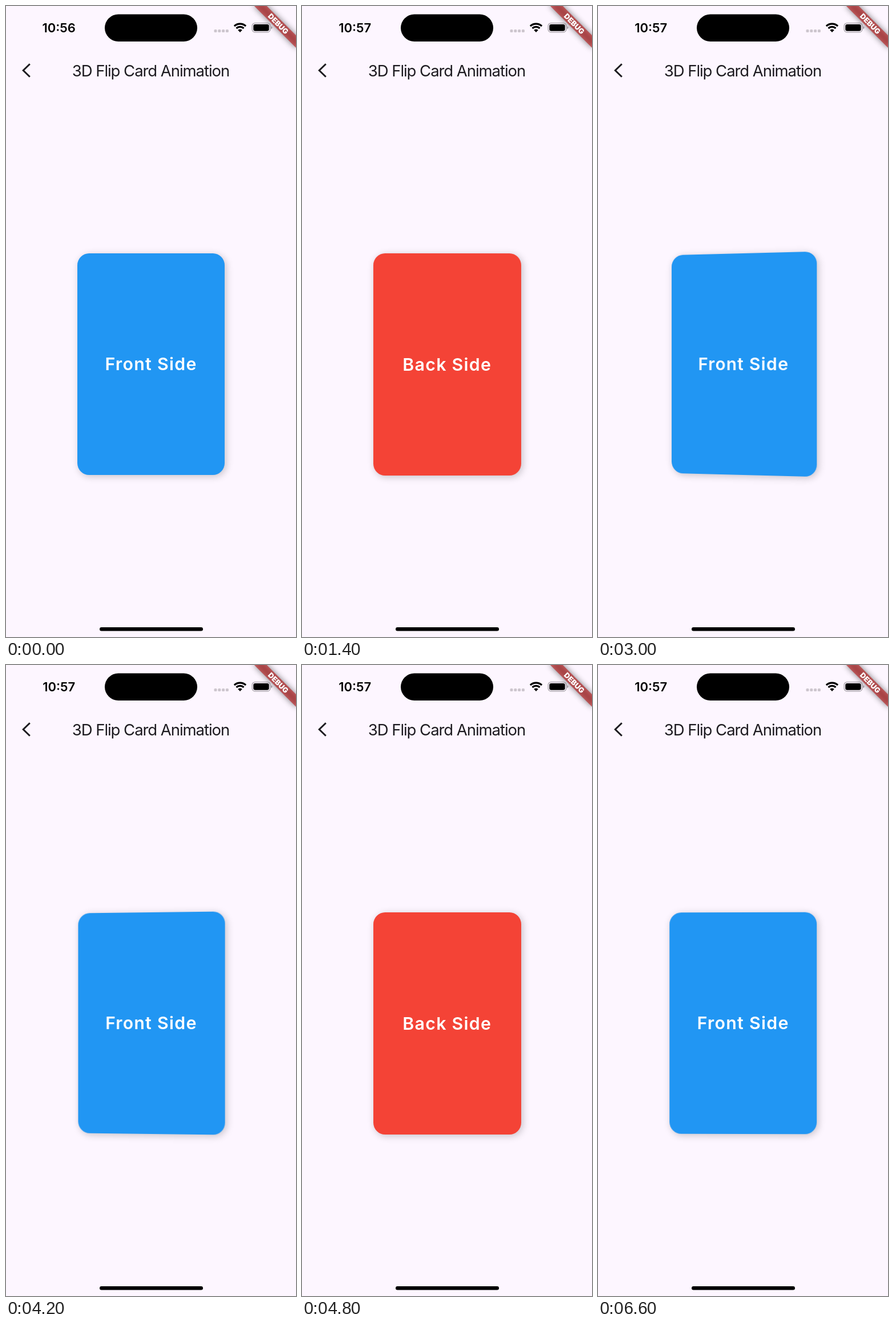
Animation, 508 px wide and 1102 px high, one loop 6700 ms. Source, as an HTML page:

```html
<!DOCTYPE html>
<html lang="en">
<head>
<meta charset="utf-8">
<title>3D Flip Card Animation</title>
<style>
  html, body { margin: 0; width: 100%; height: 100%; overflow: hidden; background: #fdf6ff; }
  body { font-family: Inter, "Noto Sans", sans-serif; }
  .screen { position: absolute; left: 0; top: 0; width: 508px; height: 1102px; overflow: hidden; }
  .chrome { position: absolute; left: 0; top: 0; font-family: inherit; }
  .stage { position: absolute; left: 124.75px; top: 431.6px; width: 258.5px; height: 387.8px; perspective: 1292.6px; }
  .card { position: absolute; inset: 0; transform-style: preserve-3d; }
  .face {
    position: absolute; inset: 0;
    display: flex; align-items: center; justify-content: center;
    border-radius: 20.7px;
    box-shadow: 2.6px 2.6px 13px rgba(0, 0, 0, .22);
    color: #fff; font-size: 30.3px; font-weight: 600; letter-spacing: 1.3px; white-space: nowrap;
    backface-visibility: hidden;
  }
  .front { background: #2196f3; }
  .back { background: #f44336; transform: rotateY(180deg); }
</style>
</head>
<body>
<div class="screen">
  <svg class="chrome" width="508" height="1102" viewBox="0 0 508 1102">
    <text id="clock" x="92.7" y="46" font-size="22" font-weight="600" text-anchor="middle">10:56</text>
    <rect x="173" y="14.5" width="162" height="47.5" rx="23.75"/>

    <g fill="#cdc6ce">
      <rect x="364.5" y="41" width="5" height="5" rx="1.5"/>
      <rect x="371.3" y="41" width="5" height="5" rx="1.5"/>
      <rect x="378.1" y="41" width="5" height="5" rx="1.5"/>
      <rect x="384.9" y="41" width="5" height="5" rx="1.5"/>
    </g>

    <g transform="translate(410 46)">
      <g fill="none" stroke="#000" stroke-width="3.2">
        <path d="M-10.1-10.8A14.8 14.8 0 0 1 10.1-10.8"/>
        <path d="M-6.5-7A9.6 9.6 0 0 1 6.5-7"/>
      </g>
      <path d="M0 0L-3.8-4A5.5 5.5 0 0 1 3.8-4Z"/>
    </g>

    <rect x="431.2" y="29.8" width="31.6" height="16" rx="4.8" fill="none" stroke="#a5a0a7" stroke-width="1.3"/>
    <rect x="433.3" y="31.9" width="27.4" height="11.8" rx="3.2"/>
    <path d="M464.3 35.2q2.2 .7 2.2 2.6t-2.2 2.6z" fill="#a5a0a7"/>

    <path d="M41.8 101.2L30.2 112.5L41.8 123.8" fill="none" stroke="#1d1b20" stroke-width="3"/>
    <text x="253.5" y="123" font-size="27.5" letter-spacing="-1.05" text-anchor="middle" fill="#1d1b20">3D Flip Card Animation</text>
    <rect x="164" y="1085" width="181" height="6.5" rx="3.25"/>

    <g transform="translate(508 0) rotate(45)">
      <rect x="-51.7" y="36.2" width="103.4" height="15.5" fill-opacity=".5" style="filter: blur(5.1px)"/>
      <rect x="-51.7" y="36.2" width="103.4" height="15.5" fill="#b71c1c" fill-opacity=".627"/>
      <text x="0" y="48.6" font-size="12.8" font-weight="900" text-anchor="middle" fill="#fff">DEBUG</text>
    </g>
  </svg>

  <div class="stage">
    <div class="card" id="card">
      <div class="face front">Front Side</div>
      <div class="face back">Back Side</div>
    </div>
  </div>
</div>

<script>
  const LOOP = 6700, STEP = 100, FLIP = 600;
  const MINUTE_AT = 1000;
  const flipStarts = [815, 2498, 4132, 6032];
  const card = document.getElementById('card');
  const clock = document.getElementById('clock');

  // cubic-bezier(.42, 0, .58, 1), solved by bisection
  function easeInOut(x) {
    if (x <= 0) return 0;
    if (x >= 1) return 1;
    let low = 0, high = 1, s;
    for (let i = 0; i < 24; i++) {
      s = (low + high) / 2;
      const bx = 1.26 * s * (1 - s) ** 2 + 1.74 * s * s * (1 - s) + s ** 3;
      if (bx < x) low = s; else high = s;
    }
    return s * s * (3 - 2 * s);
  }

  // Odd flips turn the card over, even flips turn it back.
  function turned(t) {
    return flipStarts.reduce((sum, start, i) =>
      sum + (i % 2 ? -1 : 1) * easeInOut((t - start) / FLIP), 0);
  }

  function draw() {
    // The screen refreshes ten times a second.
    const t = Math.floor(performance.now() % LOOP / STEP) * STEP;
    card.style.transform = `rotateY(${-180 * turned(t)}deg)`;
    clock.textContent = t < MINUTE_AT ? '10:56' : '10:57';
    requestAnimationFrame(draw);
  }
  draw();
</script>
</body>
</html>
```
